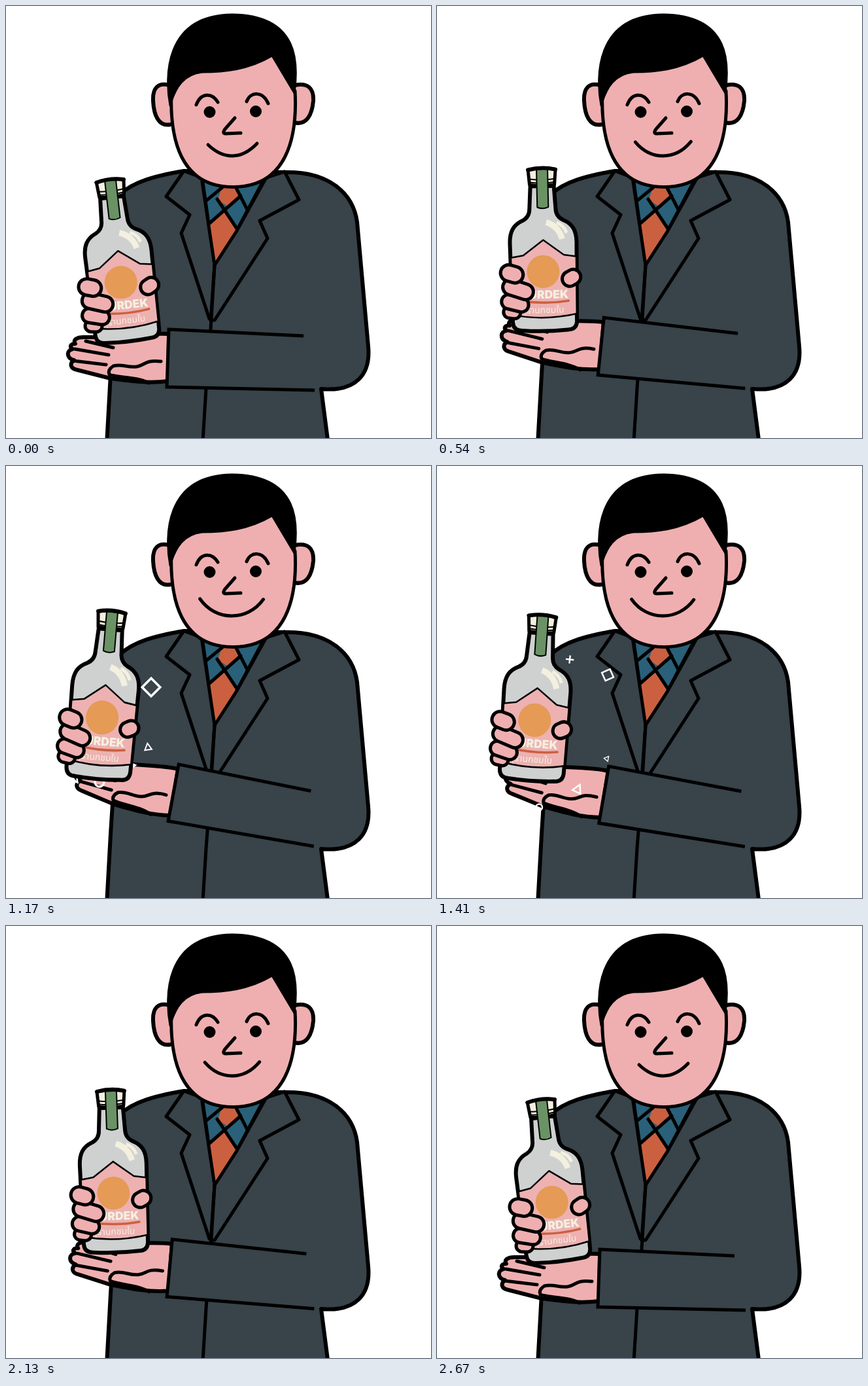
An HTML page for the animation above (2700 ms loop, 650 by 660 pixels).

```html
<!DOCTYPE html>
<html lang="en">
<head>
<meta charset="utf-8">
<title>Bottle presenter</title>
<style>
  html, body { margin: 0; width: 100%; height: 100%; overflow: hidden; background: #fff; }
  svg { display: block; width: 650px; height: 660px; }
  .ink { fill: none; stroke: #000; stroke-width: 5; stroke-linecap: round; stroke-linejoin: round; }
  .skin { fill: #efafb0; }
  .suit { fill: #38434a; }
  .edge { stroke-width: 6; }
  .thin { stroke-width: 2; }
  .spark { fill: none; stroke: #fff; stroke-width: 4.4; }
  text { fill: #f4f0df; text-anchor: end; }
  .brand { font: 900 17.5px Inter, "Liberation Sans", sans-serif; }
  .kind { font: 14px "Noto Sans Thai", "Noto Sans", sans-serif; }
</style>
</head>
<body>
<svg viewBox="0 0 650 660">
  <g class="ink">
    <!-- jacket -->
    <path class="suit edge" d="M272 252C230 259 195 268 174 288L164 500L160 562L154 670H493L482 585C536 590 558 562 554 520L537 330C531 286 494 253 428 254Z"/>
    <path d="M300 262H396L352 345L319 396Z" fill="#2a6079"/>
    <path d="M330 277L324 296L342 308L359 290L351 276ZM335 314L353 340L319 396L310 333Z" fill="#cb6040" stroke="none"/>
    <path d="M303 300L331 277M310 333L359 290M323 295L353 340M351 276L369 311"/>
    <path class="suit" d="M272 252L245 291L281 319L268 347L311 478H315L319 396L299 262Z"/>
    <path class="suit" d="M426 253L448 296L388 328L400 355L319 480H313L319 396L352 345L398 262Z"/>
    <path d="M319 396L313 494L306 584L301 665"/>
    <!-- head -->
    <path class="skin edge" d="M250 121C232 116 224 126 225 145C226 166 233 185 252 181M442 121C461 117 471 125 470 145C468 166 460 183 440 178"/>
    <path class="skin" d="M253 130C250 204 267 276.5 347 276.5C429 276.5 446 202 442 130L407 70L290 80Z"/>
    <path d="M251 152C243 110 241 14 346 13C450 14 447 90 441 133L407 76C370 98 332 101 300 101C272 104 259 124 251 152Z" fill="#000" stroke-width="3"/>
    <path d="M291 151C298 132 315 132 324 147M368 146C374 130 393 130 401 149M350 171L335 188Q330 195 336 195L359 194"/>
    <path d="M311.500 162h.01M382 161h.01" stroke-width="18"/>
    <path id="mouth"/>
  </g>

  <g id="arm" class="ink">
    <path class="skin edge" d="M249 501C222 499 196 504 160 506L122 506C107 505 102 511 106 516C98 516 97 521 102 524C92 526 92 538 104 541C97 546 98 554 109 556L160 569C190 573 218 577 248 573Z"/>
    <path d="M122 512L164 522M105 524L157 533M103 542L153 548"/>
    <path d="M218 576C200 566 170 568 158 563Q155 556 164 550C178 546 185 553 200 551C213 549 212 540 237 543"/>
    <path class="suit" d="M249 494L455 504L472 587L246 582Z" stroke="none"/>
    <path d="M455 504L249 494L246 582L472 587" stroke-linecap="butt" stroke-linejoin="miter"/>
  </g>

  <g id="sparks"></g>

  <g id="hold" class="ink">
    <g id="bottle">
      <path class="edge" fill="#cfd1d1" d="M-18 -220L-20 -186C-20 -176 -25 -171 -31 -168C-45 -162 -51 -152 -51 -134L-49 -13Q-48 -1 -35 -1Q0 2 35 -1Q48 -1 49 -13L51 -134C51 -152 45 -162 31 -168C25 -171 20 -176 20 -186L18 -220Z"/>
      <path fill="#edb1b1" stroke-width="2.5" d="M-50 -112L-31 -115L0 -138L31 -115L50 -112L49 -25Q0 -15 -49 -25Z"/>
      <path d="M5 -165Q24 -159 29 -139" stroke="#f4f0df" stroke-width="9" stroke-linecap="butt"/>
      <path d="M21 -164Q32 -160 36 -148" stroke="#f4f0df" stroke-width="5" stroke-linecap="butt"/>
      <path fill="#f4f0df" d="M-21 -245Q0 -250 21 -245L19 -222Q0 -219 -19 -222Z"/>
      <path class="thin" d="M-20 -231Q0 -228 20 -231M-20 -226Q0 -223 20 -226"/>
      <path class="thin" fill="#6a9264" d="M-8 -247H9V-188Q0 -184 -8 -188Z"/>
      <path class="edge" d="M-21 -245Q0 -250 21 -245"/>
      <circle cx="-1" cy="-90" r="25" fill="#e59a55" stroke="none"/>
      <g stroke="none">
        <text class="brand" x="37" y="-49">VURDEK</text>
        <text class="kind" x="30" y="-27">สุรานกชมใบ</text>
      </g>
      <path d="M-35 -46Q2 -40 37 -45" stroke="#cb6040" stroke-width="3.5"/>
    </g>
    <g class="skin" id="fingers"></g>
  </g>
</svg>
<script>
const LOOP = 2700, STEP = 30, PEAK = 1230, REST = 2670;
const $ = id => document.getElementById(id);
const mouth = $('mouth'), arm = $('arm'), hold = $('hold'), bottle = $('bottle');

function add(parent, tag, attrs) {
  const el = document.createElementNS('http://www.w3.org/2000/svg', tag);
  for (const k in attrs) el.setAttribute(k, attrs[k]);
  return parent.appendChild(el);
}

// x, y, width, height, tilt
[[-50, -29, 26, 18, 9], [-45, -43, 42, 22, 15], [-40, -64, 48, 24, 19],
 [-49, -88, 35, 25, 17], [42, -80, 29, 23, -28]].forEach(([x, y, w, h, a]) =>
  add($('fingers'), 'rect', {
    x: -w / 2, y: -h / 2, width: w, height: h, rx: h / 2,
    transform: `translate(${x} ${y}) rotate(${a})`
  }));

const SQUARE = 'M-12 -12H12V12H-12Z', TRI = 'M0 -12L12 10H-12Z',
      RING = 'M-9 0A9 9 0 1 1 9 0A9 9 0 1 1 -9 0Z', PLUS = 'M-11 0H11M0 -11V11';

// shape, early point, late point, size, early and late angle
const sparks = [
  [SQUARE, 222, 338, 278, 311, 1, 45, 75],
  [PLUS, 178, 322, 214, 284, 1, 20, 0],
  [TRI, 217, 429, 279, 454, .55, -8, 60],
  [TRI, 187, 458, 228, 508, 1, 85, 0],
  [RING, 143, 483, 162, 538, .95, 0, 0],
  [TRI, 105, 476, 70, 530, .7, 20, 80]
].map(([d, ...move]) => ({ el: add($('sparks'), 'path', { d, class: 'spark' }), move }));

const easeOut = u => 1 - (1 - u) ** 3;
const BORN = 990, LIFE = 960;
const lifeAt = t => (t - BORN) / LIFE;
const E1 = easeOut(lifeAt(1170)), E2 = easeOut(lifeAt(1680));

function drawSparks(t) {
  const u = lifeAt(t), live = u > 0 && u < 1;
  const k = (easeOut(u) - E1) / (E2 - E1);
  for (const { el, move: [x1, y1, x2, y2, size, a1, a2] } of sparks) {
    el.style.display = live ? '' : 'none';
    if (!live) continue;
    const mix = (a, b) => a + (b - a) * k;
    el.setAttribute('transform',
      `translate(${mix(x1, x2)} ${mix(y1, y2)}) rotate(${mix(a1, a2)}) scale(${size * (1 - u)})`);
  }
}

function draw(t) {
  const p = t < PEAK ? t / PEAK : Math.max(0, (REST - t) / (REST - PEAK));
  const pop = 1.005 + .044 * Math.max(0, 1 - Math.abs(t - PEAK) / 330);
  const lx = 309 - 13 * p, ly = 212 - 9.5 * p;
  const rx = 384 + 10 * p, ry = 210 - 6.5 * p;
  const dip = (916 - (ly + ry) / 2) / 3;
  mouth.setAttribute('d', `M${lx} ${ly}C${lx + 24} ${dip} ${rx - 24} ${dip} ${rx} ${ry}`);
  arm.setAttribute('transform', `rotate(${9 * p} 511 576)`);
  hold.setAttribute('transform',
    `translate(${187 - 49.3 * p} ${512 - 36 * p}) rotate(${12 * p - 6.5})`);
  bottle.setAttribute('transform', `scale(1 ${pop})`);
  drawSparks(t);
}

const start = performance.now();
function tick() {
  const t = (performance.now() - start) % LOOP;
  draw(Math.floor(t / STEP) * STEP);
  requestAnimationFrame(tick);
}
tick();
</script>
</body>
</html>
```
